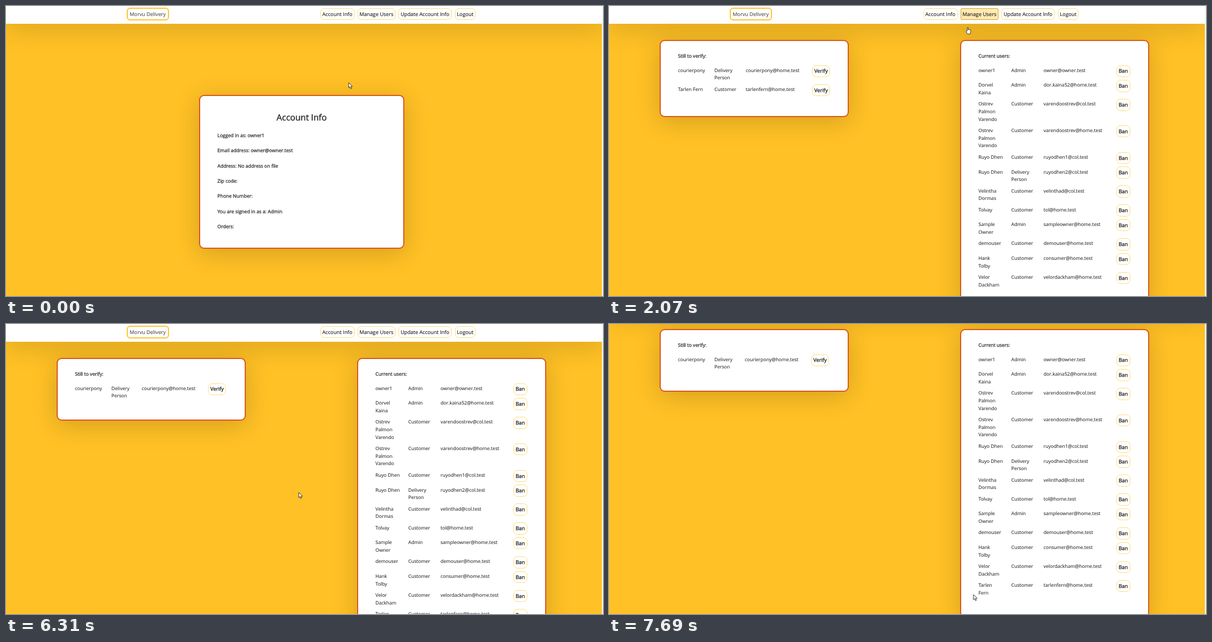
An HTML page that plays this animation: 1073 px wide and 522 px high, repeating every 8 s.

```html
<!DOCTYPE html>
<html lang="en">
<head>
<meta charset="utf-8">
<title>Account manager</title>
<style>
html, body { margin: 0; width: 100%; height: 100%; overflow: hidden; }
body {
  position: relative; background: #ffc125; color: #212529;
  font: 8.57px/13.64px "Open Sans", "Noto Sans", sans-serif;
  -webkit-text-stroke: .08px currentColor;
  text-rendering: geometricPrecision; white-space: nowrap;
}
div, svg { position: absolute; box-sizing: border-box; }
#page { left: 0; top: 0; width: 1073px; height: 600px; }
#nav { left: 0; top: 0; width: 100%; height: 32px; background: #fff; }
#links { left: 0; top: 0; }
#nav, .card { box-shadow: 0 8px 46px rgba(0, 0, 0, .175); }
.card { background: #fff; border: 2px solid #d9581e; border-radius: 9px; }
.button {
  display: flex; align-items: center; justify-content: center;
  border: 1px solid #ffdc78; border-radius: 7px; color: #111; font-size: 9.2px;
}
.brand { border: 2px solid #fcc530; border-radius: 6px; color: #444; }
.strong, .row .button { -webkit-text-stroke-width: .25px; }
.title { font-size: 15.4px; left: 0; right: 0; text-align: center; -webkit-text-stroke-width: .35px; }
.row.hover { background: #ffd259; }
.button.hover { background: #ffeab4; }
.row .button.hover { border-color: #ffe7a8; }
.button.focus { border: 1.5px solid #d9a11d; border-radius: 3px; }
.button.press { background: #ffe29b; border: 1.5px solid #c28d18; border-radius: 3px; }
.row .button.press { background: #ffe7a8; border: 1.5px solid #2b2618; }
#bar { right: 0; top: 0; width: 2px; height: 100%; background: #f5f5f5; }
#cursor { left: 0; top: 0; width: 14px; height: 18px; overflow: visible; }
#cursor path { fill: #fff; stroke: #222; stroke-width: .9; stroke-linejoin: round; }
</style>
</head>
<body>
<div id="page">
  <div id="nav"><div id="links"></div></div>
  <div id="account"></div>
  <div id="users"><div id="pending"></div><div id="current"></div></div>
</div>
<div id="bar"></div>
<svg id="cursor">
  <path id="arrow" d="M0 0V9.4L2.2 7.4L3.7 10.8L5.3 10.1L3.8 6.8H6.7Z"/>
  <path id="hand" d="M2.4 7V1Q3.3 -.2 4.2 1V4.5Q8.6 4 8.6 6.3V9L7.6 12.4H3.2L.4 8.4Q0 7 2.4 7Z"/>
</svg>
<script>
const LOOP = 8000;
const STEP = 135; // the screen refreshes in steps of this many ms
const LINE = 13.64;
const $ = id => document.getElementById(id);

function add(parent, className, style, text = '') {
  const el = document.createElement('div');
  el.className = className;
  for (const key in style) el.style[key] = style[key] + 'px';
  el.innerText = text;
  return parent.appendChild(el);
}
const box = (left, top, width, height) => ({ left, top, width, height });
const label = (parent, x, mid, text, className = '') =>
  add(parent, className, { left: x, top: mid - LINE / 2 }, text);

// Navigation
add($('links'), 'button brand', box(217, 3, 75.5, 23), 'Morvu Delivery');
const link = (text, x, width) => add($('links'), 'button', box(x, 4, width, 21), text);
link('Account Info', 564.5, 62);
const manage = link('Manage Users', 632, 67.5);
link('Update Account Info', 705, 96);
link('Logout', 807, 36.5);

// Account page
const info = add($('account'), 'card', box(347, 160, 369, 277));
add(info, 'strong title', { top: 32 }, 'Account Info');
['Logged in as: owner1', 'Email address: owner@owner.test', 'Address: No address on file',
  'Zip code:', 'Phone Number:', 'You are signed in as a: Admin', 'Orders:']
  .forEach((text, i) => label($('account'), 380, 234 + i * 2 * LINE, text, 'strong'));

// User tables: each row is as tall as its longest cell
function table(parent, { x, title, columns, action, buttonWidth, rows }) {
  const card = add(parent, 'card', box(x, 61, 340, 0));
  const left = x + 33;
  label(parent, left, 91.2, title, 'strong');
  let top = 103;
  const items = rows.map(data => {
    const texts = data.split('|');
    const lines = Math.max(...texts.map(text => text.split('/').length));
    const height = Math.max(26.6, lines * LINE + 6.8);
    const row = add(parent, 'row', box(left, top, 276, height));
    const cells = texts.map((text, i) =>
      label(row, columns[i], LINE, text.replaceAll('/', '\n')));
    const button = add(row, 'button', box(columns[3], 3.5, buttonWidth, 21.5), action);
    top += height;
    return { row, cells, button, end: top };
  });
  const showRows = count => {
    items.forEach((item, i) => show(item.row, i < count));
    card.style.height = (count ? items[count - 1].end - 24.2 : 78) + 'px';
  };
  return { items, showRows };
}
const pending = table($('pending'), {
  x: 91, title: 'Still to verify:', columns: [0, 65.5, 121.7, 241.2],
  action: 'Verify', buttonWidth: 32,
  rows: ['courierpony|Delivery/Person|courierpony@home.test', 'Tarlen Fern|Customer|tarlenfern@home.test']
});
const current = table($('current'), {
  x: 631, title: 'Current users:', columns: [0, 59, 117, 248],
  action: 'Ban', buttonWidth: 24.5,
  rows: [
    'owner1|Admin|owner@owner.test',
    'Dorvel/Kaina|Admin|dor.kaina52@home.test',
    'Ostrev/Palmon/Varendo|Customer|varendoostrev@col.test',
    'Ostrev/Palmon/Varendo|Customer|varendoostrev@home.test',
    'Ruyo Dhen|Customer|ruyodhen1@col.test',
    'Ruyo Dhen|Delivery/Person|ruyodhen2@col.test',
    'Velintha/Dormas|Customer|velinthad@col.test',
    'Tolvay|Customer|tol@home.test',
    'Sample/Owner|Admin|sampleowner@home.test',
    'demouser|Customer|demouser@home.test',
    'Hank/Tolby|Customer|consumer@home.test',
    'Velor/Dackham|Customer|velordackham@home.test',
    'Tarlen/Fern|Customer|tarlenfern@home.test'
  ]
});

// Pointer turns: step, x, y; straight lines in between
const turns = [
  [0, 616, 138], [4, 713, 31], [6, 673, 13], [14, 673, 13], [18, 547, 113],
  [21, 413, 157], [24, 378, 155], [42, 378, 155], [44, 426, 197], [49, 593, 374],
  [52, 668, 462], [54, 652, 474], [57, 655, 487]
];
function pointer(step) {
  const next = turns.findIndex(turn => turn[0] > step);
  if (next < 0) return turns.at(-1).slice(1);
  const [a, b] = [turns[next - 1], turns[next]];
  const p = (step - a[0]) / (b[0] - a[0]);
  return [1, 2].map(i => a[i] + (b[i] - a[i]) * p);
}
function scroll(step) {
  const p = Math.min(1, Math.max(0, (step - 47) / 4));
  return Math.round(52 * (1 - (1 - p) ** 4.2));
}

function shift(el, x, y = 0) { el.style.transform = `translate(${x}px, ${y}px)`; }
function show(el, visible) { el.style.display = visible ? '' : 'none'; }

function draw(t) {
  const step = Math.floor((t + 50) / STEP);
  const during = (from, to) => t >= from && t < to;
  const flag = (el, name, from, to) => el.classList.toggle(name, during(from, to));
  const loading = during(1080, 1230);
  const verified = t >= 5680;

  show($('account'), t < 1080);
  show($('users'), t >= 1080);
  show($('bar'), !loading);
  shift($('links'), loading ? 4.7 : 0);
  shift($('pending'), loading ? 2.5 : 0);
  shift($('current'), loading ? 7.5 : 0);
  shift($('page'), 0, -scroll(step));

  pending.showRows(verified ? 1 : 2);
  current.showRows(loading ? 0 : verified ? 13 : 12);
  const [first, second] = pending.items;
  for (const el of [first.cells[2], first.button]) shift(el, verified ? -1.8 : 0);

  flag(manage, 'hover', 660, 2190);
  flag(manage, 'press', 930, 1230);
  flag(manage, 'focus', 1230, 5410);
  flag(second.row, 'hover', 3000, 5680);
  flag(second.button, 'hover', 3120, 5410);
  flag(second.button, 'press', 5410, 5680);
  flag(current.items[12].row, 'hover', 7000, 7270);

  const pointing = during(660, 2190) || during(3120, 5680);
  shift($('cursor'), ...pointer(step));
  show($('hand'), pointing);
  show($('arrow'), !pointing);
}

const start = performance.now();
function tick() {
  draw((performance.now() - start) % LOOP);
  requestAnimationFrame(tick);
}
tick();
</script>
</body>
</html>
```
